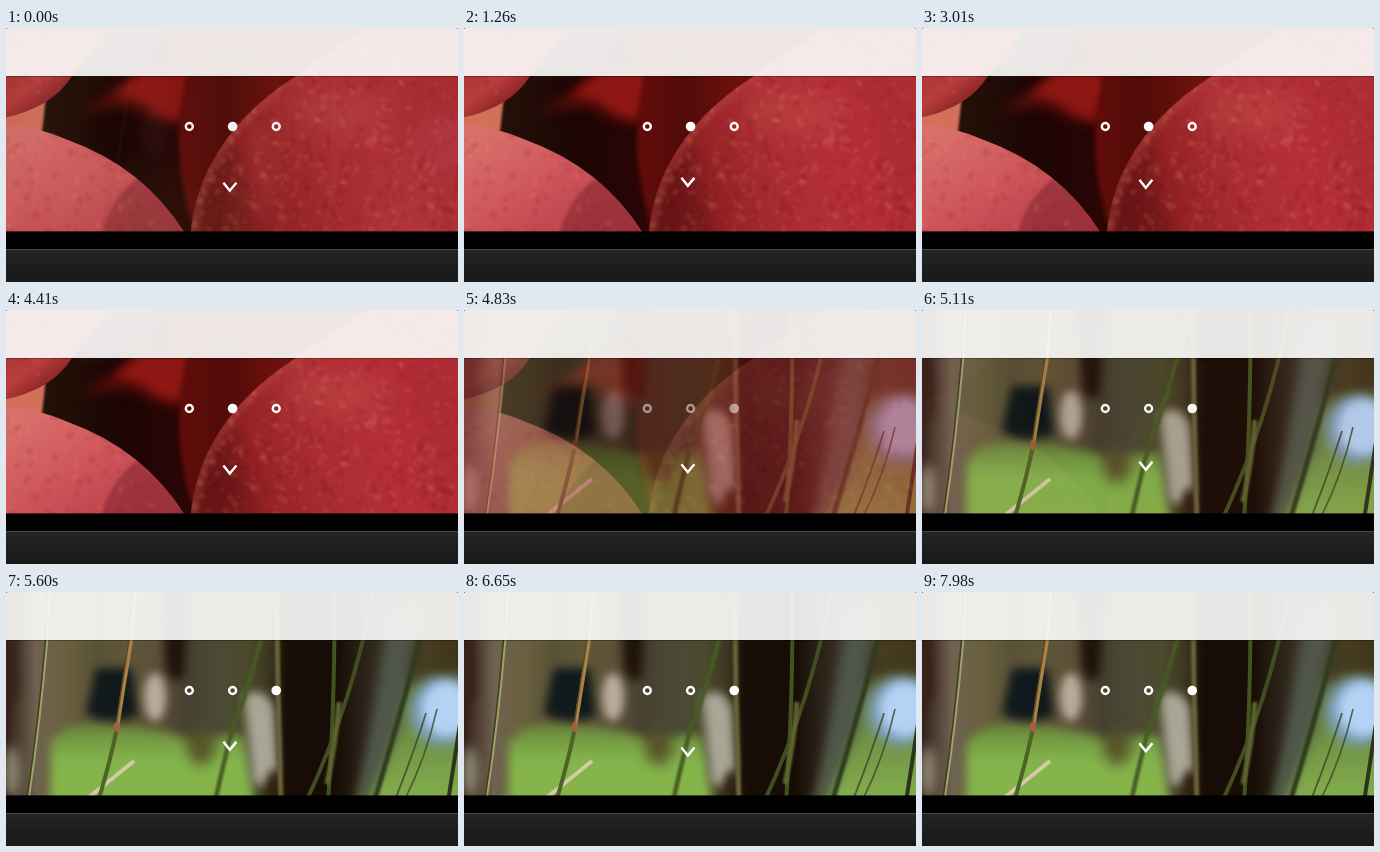
Recreate the animation shown at these times as an HTML page with a canvas. Size 452 px wide and 254 px high, loop 8000 ms.

```html
<!DOCTYPE html>
<html lang="en">
<head>
<meta charset="utf-8">
<title>Photo slider</title>
<style>
  html, body { margin: 0; width: 100%; height: 100%; overflow: hidden; background: #000; }
  canvas { display: block; }
</style>
</head>
<body>
<canvas id="stage" width="452" height="254"></canvas>
<script>
const W = 452, H = 254, PHOTO_H = 204, LOOP = 8000;
const FADE = 600, SWITCH_TIMES = [-460, 4650], BOB_PERIOD = 2100, BOB_LOW = 280;
const stage = document.getElementById('stage').getContext('2d');

function makePhoto(paint) {
  const canvas = document.createElement('canvas');
  canvas.width = W;
  canvas.height = PHOTO_H;
  paint(canvas.getContext('2d'));
  return canvas;
}

function gradient(c, x0, y0, x1, y1, colors) {
  const g = c.createLinearGradient(x0, y0, x1, y1);
  colors.forEach((color, i) => g.addColorStop(i / (colors.length - 1), color));
  return g;
}

function shape(c, d, fill, blur = 0) {
  c.filter = blur ? `blur(${blur}px)` : 'none';
  c.fillStyle = fill;
  c.fill(new Path2D(d));
}

function line(c, d, color, width, blur = 0.4) {
  c.filter = blur ? `blur(${blur}px)` : 'none';
  c.strokeStyle = color;
  c.lineWidth = width;
  c.stroke(new Path2D(d));
}

function oval(c, x, y, rx, ry, color, blur) {
  c.filter = `blur(${blur}px)`;
  c.fillStyle = color;
  c.beginPath();
  c.ellipse(x, y, rx, ry, 0, 0, 7);
  c.fill();
}

// Soft random flecks clipped to a fruit
function fuzz(c, d, count, colors) {
  let seed = 7;
  const random = () => (seed = seed * 16807 % 2147483647) / 2147483647;
  c.save();
  c.clip(new Path2D(d));
  c.filter = 'blur(0.8px)';
  for (let i = 0; i < count; i++) {
    c.fillStyle = colors[i % colors.length];
    c.beginPath();
    c.ellipse(random() * W, random() * PHOTO_H, 1 + random() * 4, 1 + random() * 2.5, random() * 3, 0, 7);
    c.fill();
  }
  c.restore();
}

function paintPeaches(c) {
  const topLeft = 'M-9-9H108Q84 28 66 48Q45 82-9 91Z';
  const bottomLeft = 'M-9 96Q32 98 62 112Q140 140 182 210H-9Z';
  const right = 'M380-9Q322 22 290 48Q233 84 206 134Q188 166 184 210H460V-9Z';
  const flecks = ['rgba(255,170,150,.11)', 'rgba(110,10,25,.12)'];

  shape(c, 'M0 0H452V204H0Z', gradient(c, 40, 0, 190, 0, ['#241008', '#1c0504', '#2c0605']));
  shape(c, 'M80-9H160L140 40L72 46Z', '#4b3029', 5);
  shape(c, 'M155-9H390L290 52H170Z', '#6a1512', 4);
  shape(c, 'M70 86Q110 68 126 42L190 30L182 96Q150 96 132 82Q112 74 70 86Z', '#5c0d09', 6);
  shape(c, 'M108 68L136 45H186L172 92L150 84Q130 66 108 68Z', '#8e1713', 4);
  shape(c, 'M182 30L175 92Q168 130 186 196L245 140L310 30Z',
    gradient(c, 170, 0, 270, 0, ['#640d0a', '#500b08', '#6c110d']), 2);
  shape(c, 'M-9 88Q20 86 40 68L36 104L-9 98Z', '#d2705a', 1);
  shape(c, topLeft, gradient(c, 0, 40, 36, 88, ['#a73436', '#b93d3d', '#7d1d1d']), 0.7);
  shape(c, bottomLeft, gradient(c, 20, 100, 90, 215, ['#d9706b', '#d0595d', '#bd424b']), 0.6);
  c.save();
  c.clip(new Path2D(bottomLeft));
  shape(c, 'M95 210Q102 172 132 150L190 200V210Z', 'rgba(125,35,45,.5)', 1.5);
  c.restore();
  shape(c, right, gradient(c, 190, 150, 420, 80, ['#711b1b', '#962326', '#ab2d32', '#b42f37', '#ae2c33']), 0.7);
  c.save();
  c.clip(new Path2D(right));
  shape(c, 'M184 204L204 138L230 112Q225 160 252 204Z', 'rgba(85,12,14,.4)', 8);
  line(c, 'M382-9Q322 22 292 48Q237 86 209 134Q191 166 187 210', 'rgba(200,95,80,.45)', 5, 3);
  oval(c, 330, 85, 55, 22, 'rgba(205,95,85,.32)', 14);
  c.restore();
  fuzz(c, topLeft, 450, flecks);
  fuzz(c, bottomLeft, 650, flecks);
  fuzz(c, right, 1100, flecks);
}

function paintGrass(c) {
  c.fillStyle = gradient(c, 0, 0, W, 0, [
    '#33211a', '#6f6250', '#69603f', '#5a5236', '#5f5739', '#5c5038', '#46402f',
    '#4b4a36', '#4b4a2c', '#38301c', '#150d06', '#1b120a', '#2d241a', '#3f382a', '#463c20', '#3f351b'
  ]);
  c.fillRect(0, 0, W, PHOTO_H);
  shape(c, 'M-9-9H9L13 100L-9 140Z', '#37221a', 5);
  shape(c, 'M45 150Q60 128 100 132Q175 138 190 152Q215 140 238 144L250 220H44Z',
    gradient(c, 0, 130, 0, 204, ['#668039', '#83b44c', '#86b44a']), 5);
  shape(c, 'M390 92L470 80V220H352L370 165Z',
    gradient(c, 0, 85, 0, 204, ['#5b6938', '#6f9145', '#82ac4c']), 7);
  shape(c, 'M384 20H412L392 140L356 220H350Z', '#50574a', 6);
  shape(c, 'M-9 0H0', '#000');
  shape(c, 'M155-9H183L178 84Q166 96 160 76Z', '#1f130b', 5);
  shape(c, 'M276-9H335L336 220H270Z', '#170d06', 6);
  oval(c, 6, 180, 8, 26, '#8f8a74', 6);
  shape(c, 'M90 76H126L132 124Q105 134 80 122Z', '#10191b', 5);
  oval(c, 149, 105, 11, 24, '#b9aa9c', 4);
  oval(c, 195, 155, 14, 18, '#565329', 7);
  shape(c, 'M238 104Q258 92 268 116L272 178Q262 202 247 190Z', '#a9a696', 5);
  oval(c, 268, 194, 8, 16, '#31200f', 5);
  oval(c, 436, 119, 32, 34, '#7d9fbd', 6);
  oval(c, 441, 117, 25, 27, '#b4d2f3', 5);

  line(c, 'M43-9L41 48Q34 130 22 210', '#a3a070', 2.6);
  line(c, 'M42-9L39.5 48Q32.5 130 20.5 210', '#3b441c', 1.6);
  line(c, 'M128 169L82 206', '#d2cba6', 4, 0.7);
  line(c, 'M129-9L125 48L111 136', '#a9824a', 4);
  line(c, 'M127-9L123 48L109.5 136', '#5f4520', 1.4);
  line(c, 'M111 136Q104 170 92 210', '#4d6424', 4);
  oval(c, 111, 135, 3.2, 5, '#a5603f', 0.6);
  line(c, 'M270-9L255 48Q235 120 228 132Q220 160 209 210', '#485a24', 4.5, 1);
  line(c, 'M271-9Q271 90 275 210', '#68633a', 5, 0.8);
  line(c, 'M328-9Q330 90 322 210', '#42531f', 4);
  line(c, 'M369-9Q348 108 300 210', '#434e20', 4, 0.7);
  line(c, 'M333 110Q330 150 321 192', '#5e6430', 5, 0.8);
  line(c, 'M426-9L414 48Q390 138 368 210', '#303c1d', 5, 0.9);
  line(c, 'M420 121Q408 160 389 208', 'rgba(58,72,38,.8)', 1.8, 0.5);
  line(c, 'M431 117Q420 165 400 205', 'rgba(58,72,38,.8)', 1.6, 0.5);
  line(c, 'M454 132L442 210', '#2c351a', 4);
}

const peaches = makePhoto(paintPeaches);
const grass = makePhoto(paintGrass);

function drawFrame(c) {
  c.fillStyle = '#000';
  c.fillRect(0, 203.4, W, H);
  c.fillStyle = gradient(c, 0, 221, 0, H, ['#252525', '#1e1e1e', '#191919']);
  c.fillRect(0, 221, W, 33);
  c.fillStyle = '#484848';
  c.fillRect(0, 221, W, 1);
  c.fillStyle = 'rgba(252,252,251,.91)';
  c.fillRect(0, 0, W, 48);
  c.fillStyle = 'rgba(0,0,0,.3)';
  c.fillRect(0, 48, W, 1);
  c.fillStyle = '#777';
  c.fillRect(0, 0, 1, 1);
  c.fillRect(W - 1, 0, 1, 1);
}

function drawDots(c, active, opacity) {
  c.globalAlpha = opacity;
  c.fillStyle = c.strokeStyle = '#fff';
  c.lineWidth = 2.4;
  [183.3, 226.6, 270.2].forEach((x, i) => {
    c.beginPath();
    c.arc(x, 98.5, i === active ? 4.8 : 3.5, 0, 7);
    i === active ? c.fill() : c.stroke();
  });
  c.globalAlpha = 1;
}

function drawArrow(c, time) {
  const tip = 160.7 + 2.9 * Math.cos((time - BOB_LOW) / BOB_PERIOD * 2 * Math.PI);
  line(c, `M217.4 ${tip - 8}L223.8 ${tip}L230.4 ${tip - 8}`, '#fff', 2.4, 0);
}

function render(time) {
  const second = time >= SWITCH_TIMES[1];
  const t = Math.min(1, (time - SWITCH_TIMES[+second]) / FADE);
  const shown = 1 - (1 - t) ** 2;
  stage.drawImage(second ? peaches : grass, 0, 0);
  stage.globalAlpha = shown;
  stage.drawImage(second ? grass : peaches, 0, 0);
  stage.globalAlpha = 1;
  drawFrame(stage);
  drawDots(stage, second ? 2 : 1, shown);
  drawArrow(stage, time);
}

function tick() {
  render(performance.now() % LOOP);
  requestAnimationFrame(tick);
}
tick();
</script>
</body>
</html>
```
